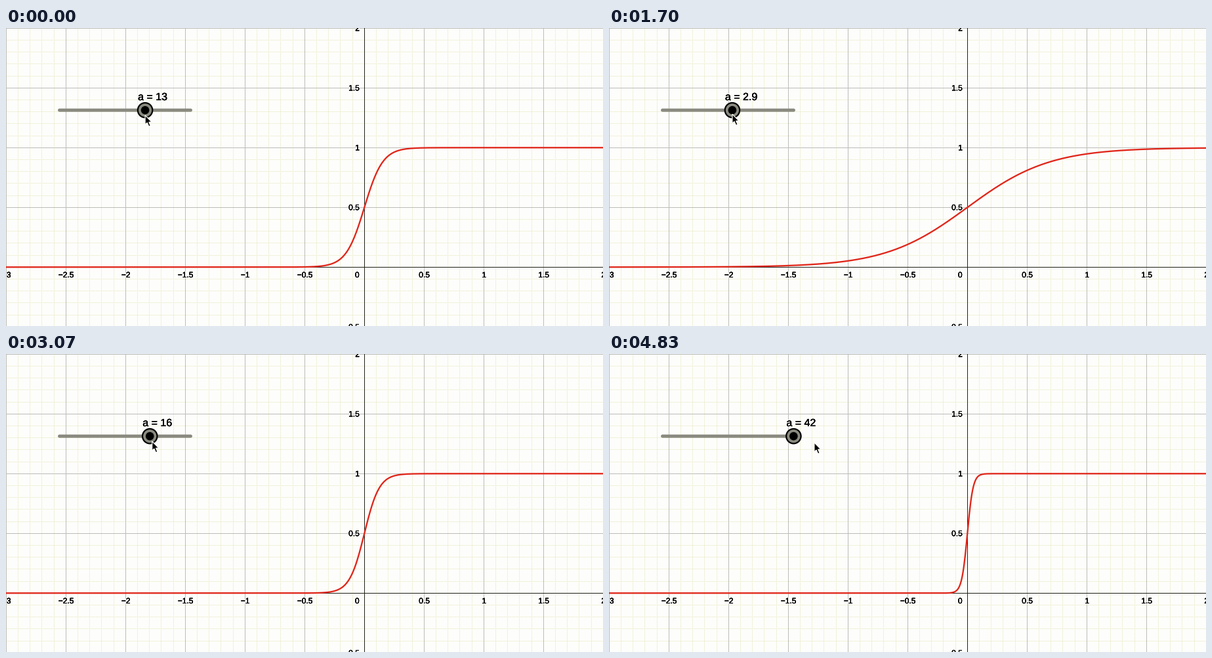
These frames come from a looping animation (910 by 454 pixels, 4860 ms). A matplotlib script:

```python
import numpy as np
import matplotlib.pyplot as plt
import matplotlib.patheffects as pe
from matplotlib.animation import FuncAnimation
from matplotlib.patches import Circle, Polygon

W, H, DPI = 910, 454, 100
LOOP, STEP = 4860, 20
PX = 72 / DPI                      # one pixel in points
X0, Y0, UNIT = 546.3, 364.3, 182   # origin and pixels per unit
PAPER, SLIDER, RED = "#fdfdfb", "#8a8a80", "#e0261a"
ARROW = 1.05 * np.array([(0, 0), (0, 13.5), (3, 10.7), (5.4, 16.2),
                         (7.8, 15.2), (5.5, 9.8), (9.6, 9.8)])


def ease(t, start, end):
    """Cosine ease from 0 to 1 between two times in ms."""
    u = np.clip((t - start) / (end - start), 0, 1)
    return (1 - np.cos(np.pi * u)) / 2


def slope(t):
    """Slider value: one drag to the left, then two to the right."""
    return (13 - 10.1 * ease(t, 0, 1500) + 6.2 * ease(t, 1700, 2813)
            + 32.9 * ease(t, 2600, 4155))


def pointer_offset(t):
    """Pointer tip relative to the knob; it leaves the knob at the end."""
    lead = 4 * np.sin(np.pi * ease(t, 2600, 3800))
    leave = ease(t, 4000, 4900)
    lift = 1.8 * np.exp(-((t - 1700) / 400) ** 2)
    return lead + 32 * leave, 133 - lift + 2 * leave


fig = plt.figure(figsize=(W / DPI, H / DPI), dpi=DPI, facecolor=PAPER)
ax = fig.add_axes([0, 0, 1, 1])
ax.set_xlim(0, W)
ax.set_ylim(H, 0)
ax.axis("off")


def rule(pos, vertical, color, style="-", z=1):
    """One-pixel line across the whole stage."""
    ends = ([pos, pos], [0, H]) if vertical else ([0, W], [pos, pos])
    ax.plot(*ends, color=color, lw=PX, ls=style, solid_capstyle="butt",
            dash_capstyle="butt", snap=False, zorder=z)


def label(x, y, s, size=12, ha="center", z=5):
    effects = [pe.withStroke(linewidth=2.5 * PX, foreground=PAPER),
               pe.withStroke(linewidth=0.3 * PX, foreground="black")]
    return ax.text(x, y, s, family="Liberation Sans", fontsize=size * PX, ha=ha,
                   va="baseline", color="black", path_effects=effects, zorder=z)


def grid(origin, low, high, vertical):
    for k in range(low, high + 1):
        pos = np.floor(origin + k * UNIT / 10) + 0.5
        if k == 0:
            rule(pos, vertical, "#202018", z=3)
        elif k % 5 == 0:
            rule(pos, vertical, "#bcbcb8", z=2)
        else:
            rule(pos, vertical, "#f8f8ea")
            rule(pos, vertical, "#ebebcc", (0, (1, 1)))


grid(X0, -30, 19, True)
grid(Y0, -20, 4, False)

for k in range(-6, 5):
    text = f"{k / 2:g}".replace("-", "\u2212")
    if k:
        label(X0 + k * UNIT / 2 + 0.4, 380, text)
    if k and k >= -1:
        label(539, Y0 - k * UNIT / 2 + 4, text, ha="right")
label(535.3, 380, "0")

xs = np.linspace(0, W, W + 1)
curve, = ax.plot([], [], color=RED, lw=2.3 * PX, zorder=4)

ax.plot([81.5, 281.5], [125.2, 125.2], color=SLIDER, lw=5 * PX,
        solid_capstyle="round", snap=False, zorder=6)
ring = Circle((0, 0), 11.2, fc=SLIDER, ec="black", lw=2.2 * PX, zorder=7)
dot = Circle((0, 0), 6.3, fc="black", ec="none", zorder=8)
pointer = Polygon(ARROW, closed=True, fc="black", ec="#fffffa", lw=1.2 * PX, zorder=10)
for patch in (ring, dot, pointer):
    ax.add_patch(patch)
value = label(0, 110, "", size=16, ha="left", z=9)


def draw(i):
    t = (i + 0.5) * STEP
    a = round(float(slope(t)), 1)
    x = 181 + 2.39 * a
    curve.set_data(xs, Y0 - UNIT / (1 + np.exp(-a * (xs - X0) / UNIT)))
    ring.center = dot.center = (x, 125.2)
    value.set_text(f"a = {a:g}")
    value.set_x(x - 11)
    dx, y = pointer_offset(t)
    pointer.set_xy(ARROW + (x + dx, y))
    return curve, ring, dot, value, pointer


anim = FuncAnimation(fig, draw, frames=LOOP // STEP, interval=STEP,
                     repeat=True, repeat_delay=0)
plt.show()
```
